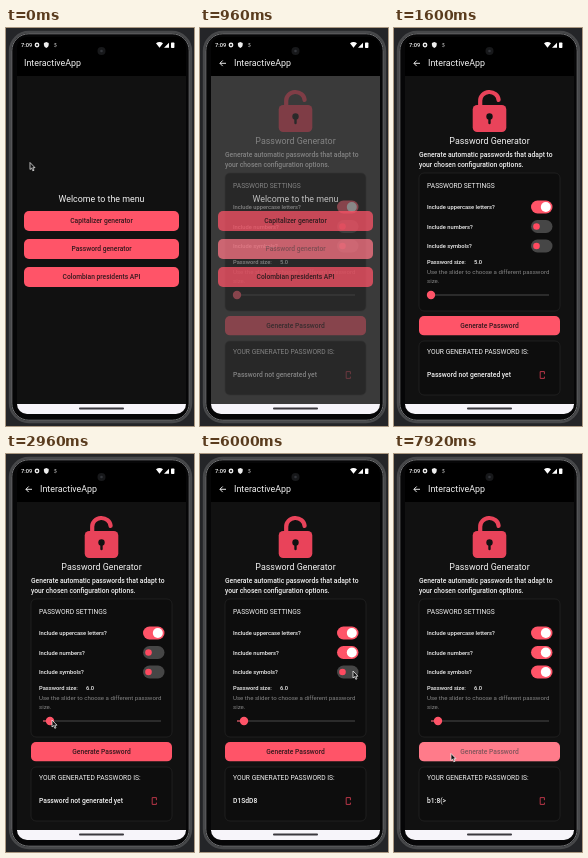
An HTML page for the animation above (8 s loop, 188 by 398 pixels).

```html
<!DOCTYPE html>
<html lang="en">
<head>
<meta charset="utf-8">
<title>Password generator demo</title>
<style>
html, body { margin: 0; width: 100%; height: 100%; overflow: hidden; background: #242528; }
svg { display: block; width: 188px; height: 398px; }
text { font-family: Roboto, Inter, sans-serif; fill: #f2f2f2; }
.mid { text-anchor: middle; }
.label { font-size: 5.75px; font-weight: 500; }
.body { font-size: 6.72px; font-weight: 500; }
.caps { font-size: 6.7px; }
.hint { font-size: 6.1px; fill: #858585; }
.action { font-size: 6.7px; font-weight: 500; fill: #35191e; text-anchor: middle; }
.card { fill: #0d0d0d; stroke: #262626; stroke-width: .7; }
</style>
</head>
<body>
<svg id="stage" viewBox="0 0 188 398" xmlns="http://www.w3.org/2000/svg">
  <defs>
    <clipPath id="screen"><rect x="11" y="9" width="169" height="377" rx="10"/></clipPath>
  </defs>
  <rect width="188" height="398" fill="#242528"/>
  <rect x="4" y="4" width="181" height="390" rx="19" fill="#060607" stroke="#47484a" stroke-width="2.4"/>
  <rect x="5.8" y="5.8" width="177.4" height="386.4" rx="17" fill="none" stroke="#727375" stroke-width="1"/>
  <g clip-path="url(#screen)">
    <rect x="11" y="9" width="169" height="378" fill="#000"/>
    <rect id="backdrop" x="11" y="48" width="169" height="328"/>
    <g id="page"></g>
    <g id="menu"></g>
    <rect x="11" y="376" width="169" height="11" fill="#f7f5fa"/>
    <rect x="73" y="379.6" width="45" height="1.8" rx=".9" fill="#3a383e"/>
  </g>
  <g id="statusBar">
    <text x="15" y="19" font-size="5.7" font-weight="500">7:09</text>
    <circle cx="31" cy="17" r="1.7" fill="none" stroke="#eee" stroke-width="1.4"/>
    <path d="M40.3 14l2.4 1v2q0 2-2.4 3q-2.4-1-2.4-3v-2z" fill="#eee"/>
    <path d="M50.4 15.7q-2-.8-2 .5q2.2 .6 2 1.9q-.8 1-2.2 .2" fill="none" stroke="#bbb" stroke-width=".7"/>
    <path d="M150 15.3q3.5-2.5 7 0l-3.5 4.4zM158 19.7l5-5v5z" fill="#fff"/>
    <rect x="165" y="14.5" width="3.4" height="5.4" rx=".7" fill="#fff"/>
    <circle cx="95.5" cy="23" r="4" fill="#17181a"/>
    <circle cx="95.5" cy="23" r="1.3" fill="#33353a"/>
  </g>
  <path id="back" d="M26 35.3H20M22.7 32.5L19.9 35.3L22.7 38.1" fill="none" stroke="#fff" stroke-width=".9"/>
  <text id="title" y="38.3" font-size="8.9">InteractiveApp</text>
  <path id="cursor" d="M0 0V7L1.6 5.6L2.8 8.3L4 7.8L2.8 5.2H5Z" fill="#111" stroke="#fff" stroke-width=".7"/>
</svg>
<script>
const LOOP = 8000, STEP = 80, RED = '#ff5468';
const $ = id => document.getElementById(id);
const set = (node, attrs) => {
  for (const key in attrs) node.setAttribute(key, attrs[key]);
};
const clamp = v => Math.min(1, Math.max(0, v));
const ramp = (t, from, to) => {
  const p = clamp((t - from) / (to - from));
  return p * p * (3 - 2 * p);
};
const mix = (a, b, p) => a + (b - a) * p;
const mixRgb = (a, b, p) => `rgb(${a.map((v, i) => Math.round(mix(v, b[i], p)))})`;

const button = (id, x, y, w, h, label) => `
  <clipPath id="${id}Clip"><rect x="${x}" y="${y}" width="${w}" height="${h}" rx="5"/></clipPath>
  <g clip-path="url(#${id}Clip)">
    <rect x="${x}" y="${y}" width="${w}" height="${h}" fill="${RED}"/>
    <text id="${id}Text" class="action" x="${x + w / 2}" y="${y + h / 2 + 2.3}">${label}</text>
    <rect id="${id}Tint" x="${x}" y="${y}" width="${w}" height="${h}" fill="#fff" opacity="0"/>
    <circle id="${id}Ripple" fill="#fff" opacity="0"/>
  </g>`;
const toggle = (id, y, label) => `
  <text class="label" x="33" y="${y + 2}">${label}</text>
  <rect id="${id}Track" x="137" y="${y - 6.5}" width="21.5" height="13" rx="6.5"/>
  <circle id="${id}Knob" cy="${y}"/>`;

$('menu').innerHTML = `
  <text class="mid" x="95.5" y="174" font-size="8.9">Welcome to the menu</text>` +
  ['Capitalizer generator', 'Password generator', 'Colombian presidents API']
    .map((label, i) => button('menu' + i, 18, 183 + 28 * i, 155, 20, label)).join('');

$('page').innerHTML = `
  <path d="M86.2 79V73A9.2 8.5 0 0 1 104.6 72" fill="none" stroke="#e9435a" stroke-width="4.2" stroke-linecap="round"/>
  <rect x="78.7" y="77" width="33.6" height="27" rx="4.5" fill="#e9435a"/>
  <circle cx="95.5" cy="88.5" r="3.2" fill="#121212"/>
  <path d="M95.5 89V95" stroke="#121212" stroke-width="2.4" stroke-linecap="round"/>
  <text class="mid" x="95.5" y="116" font-size="8.9">Password Generator</text>
  <text class="body" x="25" y="129.3">Generate automatic passwords that adapt to</text>
  <text class="body" x="25" y="138.5">your chosen configuration options.</text>
  <rect class="card" x="25" y="145" width="141" height="138" rx="5"/>
  <text class="caps" x="33" y="160">PASSWORD SETTINGS</text>
  ${toggle('upper', 179, 'Include uppercase letters?')}
  ${toggle('numbers', 198.5, 'Include numbers?')}
  ${toggle('symbols', 218, 'Include symbols?')}
  <text class="label" x="33" y="236">Password size:</text>
  <text id="size" class="label" x="80" y="236"></text>
  <text class="hint" x="33" y="246.3">Use the slider to choose a different password</text>
  <text class="hint" x="33" y="255">size.</text>
  <path d="M37 267H155" stroke="#4a4a4a" stroke-width="1.2"/>
  <path id="sliderFill" stroke="${RED}" stroke-width="1.2"/>
  <circle id="sliderKnob" cy="267" r="4.2" fill="${RED}"/>
  ${button('generate', 25, 288, 141, 19.5, 'Generate Password')}
  <rect class="card" x="25" y="313" width="141" height="54" rx="5"/>
  <text class="caps" x="33" y="326">YOUR GENERATED PASSWORD IS:</text>
  <text id="password" class="body" x="33" y="349.3"></text>
  <path d="M150.4 346.2V343.6H146.2V350.4H150.4V348.6" fill="none" stroke="#c93a4e" stroke-width=".9"/>`;

// Cursor stops: time, x, y
const PATH = [
  [0, 24, 134.5], [80, 24, 134.5], [400, 76, 228], [560, 80, 222],
  [1920, 15, 292], [2560, 38, 266], [2720, 38, 266], [2880, 46, 266],
  [2960, 46, 266], [3200, 104, 236], [3360, 104, 236], [3840, 147, 198],
  [4160, 147, 198], [4480, 78, 310], [4800, 64, 299], [5360, 64, 299],
  [5840, 153, 217], [6080, 153, 217], [6560, 57, 299.5]
];
const PASSWORDS = [
  [0, 'Password not generated yet'], [5200, 'D1SdD8'],
  [6960, 'k$4T!a'], [7360, '%R7u&2'], [7760, 'b1:8(>']
];
const PRESSES = [5040, 6800, 7200, 7680];

function cursorAt(t) {
  const i = PATH.findIndex(stop => stop[0] > t);
  if (i < 0) return PATH[PATH.length - 1].slice(1);
  const [t0, x0, y0] = PATH[i - 1], [t1, x1, y1] = PATH[i];
  const p = ramp(t, t0, t1);
  return [mix(x0, x1, p), mix(y0, y1, p)];
}

function drawToggle(id, t, start) {
  const p = ramp(t, start, start + 240);
  const pressed = p * (1 - ramp(t, start + 320, start + 560));
  set($(id + 'Track'), { fill: mixRgb([70, 70, 70], [255, 84, 104], p) });
  set($(id + 'Knob'), {
    cx: mix(142.5, 151.8, p),
    r: mix(3.3, 5, p) + .6 * pressed,
    fill: p < .5 ? '#ff4a60' : mixRgb([255, 255, 255], [195, 190, 192], pressed)
  });
}

function drawPress(id, t, start, x, y) {
  const age = t - start;
  const glow = age < 0 ? 0 : ramp(age, -80, 120) * (1 - ramp(age, 260, 480));
  set($(id + 'Tint'), { opacity: .16 * glow });
  set($(id + 'Ripple'), { cx: x, cy: y, r: Math.max(0, age) * .5, opacity: .08 * glow });
  set($(id + 'Text'), { opacity: 1 - .2 * glow });
}

function draw(time) {
  const t = Math.floor(time % LOOP / STEP) * STEP;
  const fade = ramp(t, 720, 1280);
  const paged = t >= 720;

  set($('menu'), { opacity: 1 - ramp(t, 840, 1200) });
  set($('page'), { opacity: fade });
  set($('backdrop'), { fill: mixRgb([17, 17, 17], [60, 60, 60], 4 * fade * (1 - fade)) });
  set($('back'), { opacity: paged ? 1 : 0 });
  set($('title'), { x: paged ? 34 : 18 });

  const [x, y] = cursorAt(t);
  set($('cursor'), {
    transform: `translate(${x} ${y})`,
    opacity: t < 720 || t >= 2000 ? 1 : 0
  });

  const held = ramp(t, 480, 640) * (1 - ramp(t, 1040, 1280));
  set($('menu1Tint'), { opacity: .2 * held });
  set($('menu1Text'), { opacity: 1 - .4 * held });

  drawToggle('upper', t, -1000);
  drawToggle('numbers', t, 4160);
  drawToggle('symbols', t, 6000);

  const knob = mix(37, 44, ramp(t, 2720, 2880));
  set($('sliderFill'), { d: `M37 267H${knob}` });
  set($('sliderKnob'), { cx: knob });
  $('size').textContent = t < 2800 ? '5.0' : '6.0';

  const press = PRESSES.filter(start => start <= t).pop() ?? LOOP;
  drawPress('generate', t, press, x, y);
  $('password').textContent = PASSWORDS.filter(([start]) => start <= t).pop()[1];
}

const origin = performance.now();
function tick() {
  draw(performance.now() - origin);
  requestAnimationFrame(tick);
}
draw(0);
requestAnimationFrame(tick);
</script>
</body>
</html>
```
